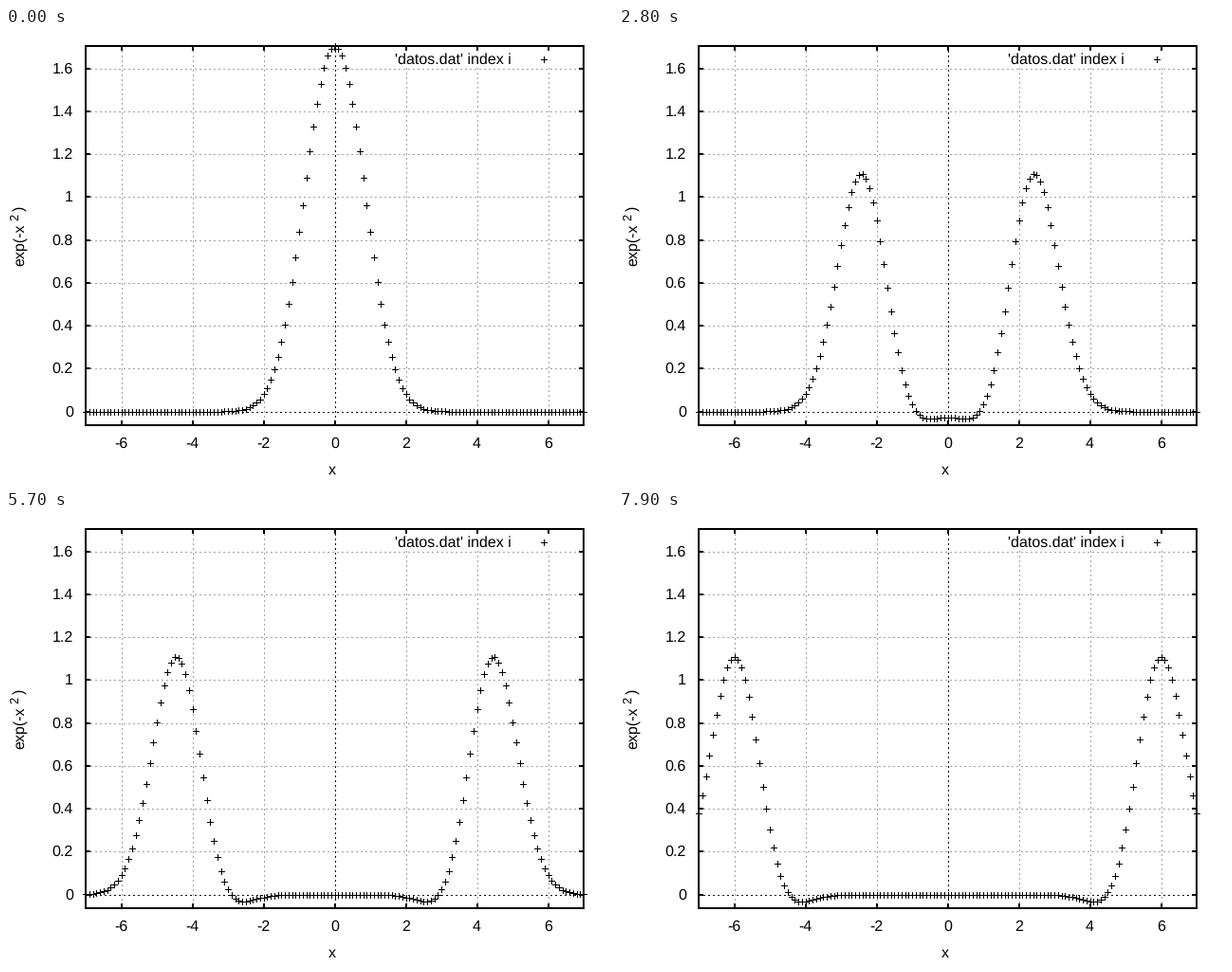
These frames come from a looping animation (640x480 px, 8 s). A matplotlib script:

```python
import numpy as np
import matplotlib.pyplot as plt
from matplotlib.animation import FuncAnimation

W, H, DPI = 640, 480, 100
FRAMES, INTERVAL = 80, 100
LEFT, RIGHT, TOP, BOTTOM = 84, 609, 19, 419
DX, COURANT, SHIFT = 0.1, 0.7, 0.4
PX = 72 / DPI

plt.rcParams.update({"font.family": "Liberation Sans", "text.hinting": "none"})

fig = plt.figure(figsize=(W / DPI, H / DPI), dpi=DPI, facecolor="white")
ax = fig.add_axes([0, 0, 1, 1])
ax.set_xlim(0, W)
ax.set_ylim(H, 0)
ax.axis("off")


def col(x):
    return np.floor(347 + 37.5 * x + 1e-6)


def row(y):
    return np.floor(405.1 - 226.25 * y)


def line(xs, ys, width=1, color="black", **kw):
    return ax.plot(xs, ys, color=color, lw=width * PX, antialiased=False,
                   snap=False, solid_capstyle="butt", dash_capstyle="butt",
                   **kw)[0]


def dotted(xs, ys, color):
    line(xs, ys, color=color, dashes=(2, 3), zorder=1)


def label(x, y, s, ha="center", size=16, **kw):
    ax.text(x, y, s, ha=ha, va="baseline", fontsize=size * PX, zorder=4, **kw)


def plus_path(cx, cy):
    """Pixel-aligned plus signs as one path with gaps."""
    gap = np.full_like(cx, np.nan)
    xs = np.stack([cx - 3, cx + 4, gap, cx + 0.5, cx + 0.5, gap], axis=1)
    ys = np.stack([cy + 0.5, cy + 0.5, gap, cy - 3, cy + 4, gap], axis=1)
    return xs.ravel(), ys.ravel()


def start(x, t):
    """Two Gaussians whose initial velocity exceeds the wave speed."""
    r = 1 / COURANT

    def right(s):
        return ((1 + r) * np.exp(-(s - SHIFT)**2)
                + (1 - r) * np.exp(-(s + SHIFT)**2)) / 2

    return right(x - t) + right(-x - t)


def solve():
    """Leapfrog solution of the wave equation, one row per frame."""
    x = np.arange(-160, 161) * DX
    u = [start(x, 0), start(x, COURANT * DX)]
    while len(u) < FRAMES:
        a, b = u[-2:]
        bend = np.roll(b, 1) - 2 * b + np.roll(b, -1)
        u.append(2 * b - a + COURANT**2 * bend)
    seen = slice(90, 231)
    return x[seen], np.array(u)[:, seen]


# Grid, ticks and tick labels
for v in range(-6, 7, 2):
    c = col(v)
    top = 42 if v > 0 else TOP
    dotted([c + 0.5] * 2, [top, BOTTOM], "#a0a0a0")
    line([c, c], [BOTTOM, BOTTOM - 5], 2, zorder=2)
    line([c, c], [TOP, TOP + 5], 2, zorder=2)
    label(c - 0.5, 443, str(v))

for i in range(9):
    v = i / 5
    r = row(v)
    dotted([LEFT, RIGHT], [r + 0.5] * 2, "#a0a0a0")
    line([LEFT, LEFT + 5], [r, r], 2, zorder=2)
    line([RIGHT, RIGHT - 5], [r, r], 2, zorder=2)
    label(71, r + 5, f"{v:g}", ha="right")

dotted([LEFT, RIGHT], [row(0) + 0.5] * 2, "black")
dotted([col(0) + 0.5] * 2, [TOP, BOTTOM], "black")

# Border
for y in (TOP, BOTTOM):
    line([LEFT - 1, RIGHT + 1], [y, y], 2, zorder=3)
for x in (LEFT, RIGHT):
    line([x, x], [TOP - 1, BOTTOM + 1], 2, zorder=3)

# Axis titles and key
label(344, 471, "x")
turned = dict(ha="left", rotation=90, rotation_mode="anchor")
label(19, 251, "exp(-x", **turned)
label(13, 203, "2", size=12.8, **turned)
label(19, 193, ")", **turned)
label(533, 38, "'datos.dat' index i", ha="right")
line(*plus_path(np.array([567.0]), np.array([33.0])), zorder=5)

grid_x, wave = solve()
points = line([], [], zorder=5)


def update(n):
    points.set_data(*plus_path(col(grid_x), row(wave[n])))
    return (points,)


anim = FuncAnimation(fig, update, frames=FRAMES, interval=INTERVAL,
                     repeat=True, repeat_delay=0)
plt.show()
```
